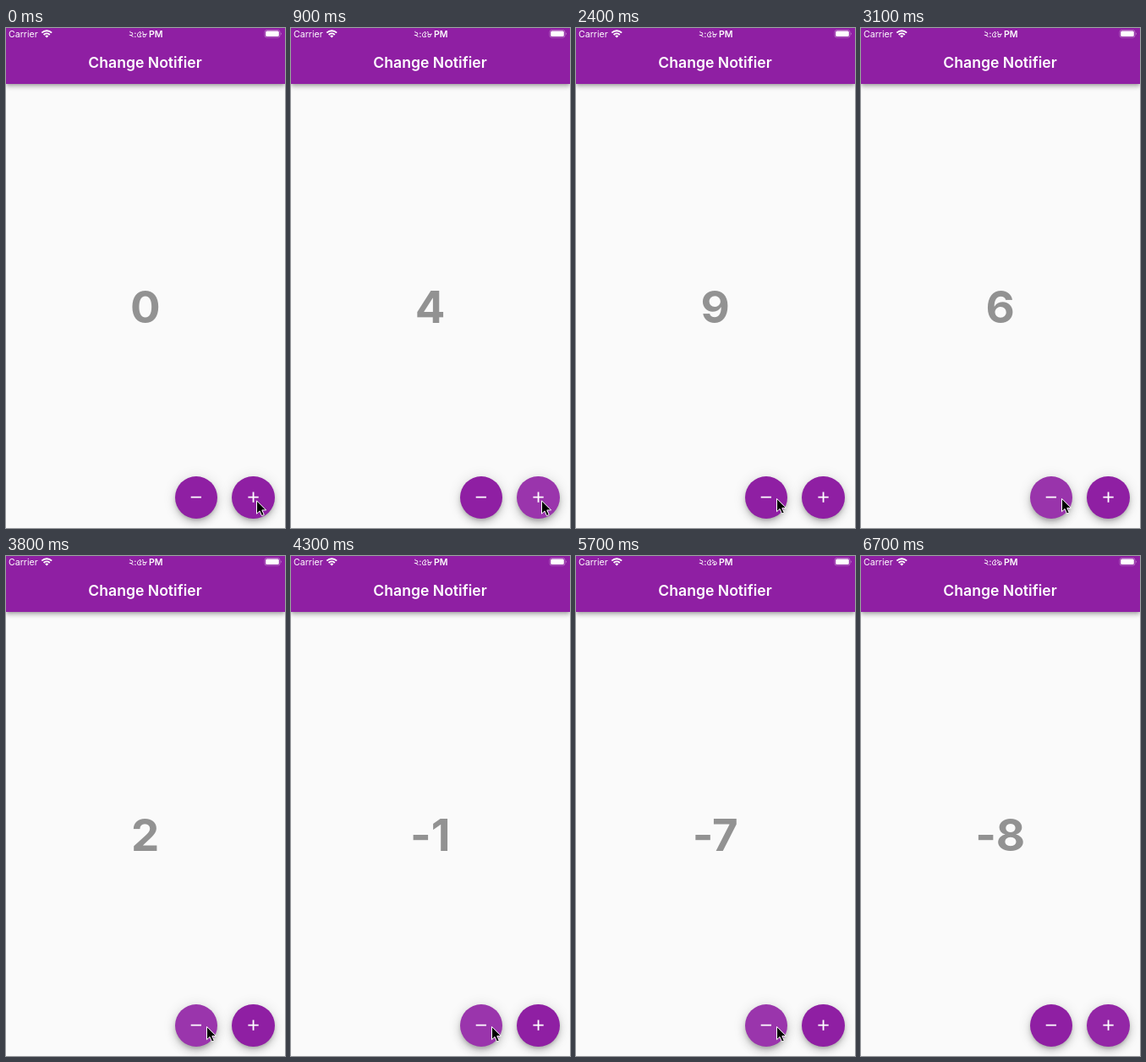
Animation, 330 px wide and 590 px high, one loop 6800 ms. Source, as an HTML page:

```html
<!DOCTYPE html>
<html lang="en">
<head>
<meta charset="utf-8">
<title>Change Notifier</title>
<style>
html, body { margin: 0; width: 100%; height: 100%; overflow: hidden; background: #fafafa; }
body { position: relative; font-family: Inter, "Noto Sans Bengali", "Noto Sans", sans-serif;
  font-feature-settings: "calt" 0; }
svg { position: absolute; left: 0; top: 0; }
.bar { position: absolute; left: 0; top: 0; width: 330px; height: 65.6px; background: #8f1fa3;
  box-shadow: 0 2px 3.5px -1px #0003, 0 3.5px 4.4px #00000024, 0 1px 9px #0000001f; }
.fab { position: absolute; top: 528.7px; width: 50.3px; height: 50.3px; border-radius: 50%; }
</style>
</head>
<body>
<div class="bar"></div>
<div class="fab" id="minus" style="left:199.7px"></div>
<div class="fab" id="plus" style="left:267.4px"></div>
<svg width="330" height="590" fill="#fff">
  <g font-size="10.6">
    <text x="3" y="11">Carrier</text>
    <text id="clock" x="167" y="11" text-anchor="end" font-weight="500"></text>
    <text x="169" y="11" font-weight="600">PM</text>
  </g>
  <g fill="none" stroke="#fff" stroke-width="1.9">
    <path d="M42.3 5.6a8.4 8.4 0 0 1 11.8 0M44.6 8a5.1 5.1 0 0 1 7.2 0"/>
    <path d="M48.2 11.6l-2-2a2.8 2.8 0 0 1 4 0z" fill="#fff" stroke="none"/>
    <rect x="306" y="2.5" width="18" height="8.6" rx="2.4" stroke-width=".8" opacity=".4"/>
    <path d="M218.7 553.7H231M286.4 553.7h12.3m-6.15-6.15v12.3" stroke-width="1.8"/>
  </g>
  <rect x="307.2" y="3.6" width="15.6" height="6.4" rx="1.5"/>
  <path d="M325 5.3q1.6 1.5 0 3z" opacity=".5"/>
  <text x="164.5" y="47" font-size="17.6" font-weight="600" text-anchor="middle">Change Notifier</text>
  <text id="count" x="164.7" y="348.4" font-size="52.8" font-weight="700" text-anchor="middle" fill="#929292"></text>
  <path id="cursor" d="M.5.8v15.4l3.5-3.3 2.5 5.7 2.8-1.2-2.5-5.5h4.8z" fill="#000" stroke="#fff" stroke-width="1"/>
</svg>
<script>
const LOOP = 6800, STEP = 100;
const el = id => document.getElementById(id);
const clamp = v => Math.max(0, Math.min(1, v));

// Evenly spaced taps
const run = (start, gap, n) => Array.from({ length: n }, (_, i) => start + i * gap);
const ups = [...run(450, 150, 9), 6500];
const downs = [...run(2600, 185, 11), ...run(4920, 185, 7)];
const passed = (taps, t) => taps.filter(tap => tap <= t).length;

// Highlight rises on press, just before the tap counts, then fades.
const glow = (taps, t) => Math.max(...taps.map(tap =>
  t < tap ? clamp((t - tap + 110) / 60) : clamp(1 - (t - tap - 100) / 150)));

function ease(t, from, to) {
  const u = clamp((t - from) / (to - from));
  return u * u * (3 - 2 * u);
}

function paintButton(id, g) {
  const s = el(id).style;
  s.background = `color-mix(in srgb, #fff ${10 * g}%, #8f1fa3)`;
  s.boxShadow = `0 ${2.6 + g}px ${4.4 + g}px -1px #0003,
    0 ${5.3 + g}px ${8.8 + 2 * g}px #00000024, 0 1px 15.8px #0000001f`;
}

function draw(now) {
  const t = Math.floor(now % LOOP / STEP) * STEP;
  el("count").textContent = passed(ups, t) - passed(downs, t);
  el("clock").textContent = t < 5300 ? "২:৫৮" : "২:৫৯";
  paintButton("plus", glow(ups, t));
  paintButton("minus", glow(downs, t));
  // The pointer crosses to the minus button and back.
  const k = ease(t, 1800, 2300) - ease(t, 6050, 6400);
  el("cursor").setAttribute("transform", `translate(${296 - 59 * k} ${557 - 2.5 * k})`);
  el("cursor").style.display = t < 6700 ? "" : "none";
  requestAnimationFrame(draw);
}
draw(performance.now());
</script>
</body>
</html>
```
